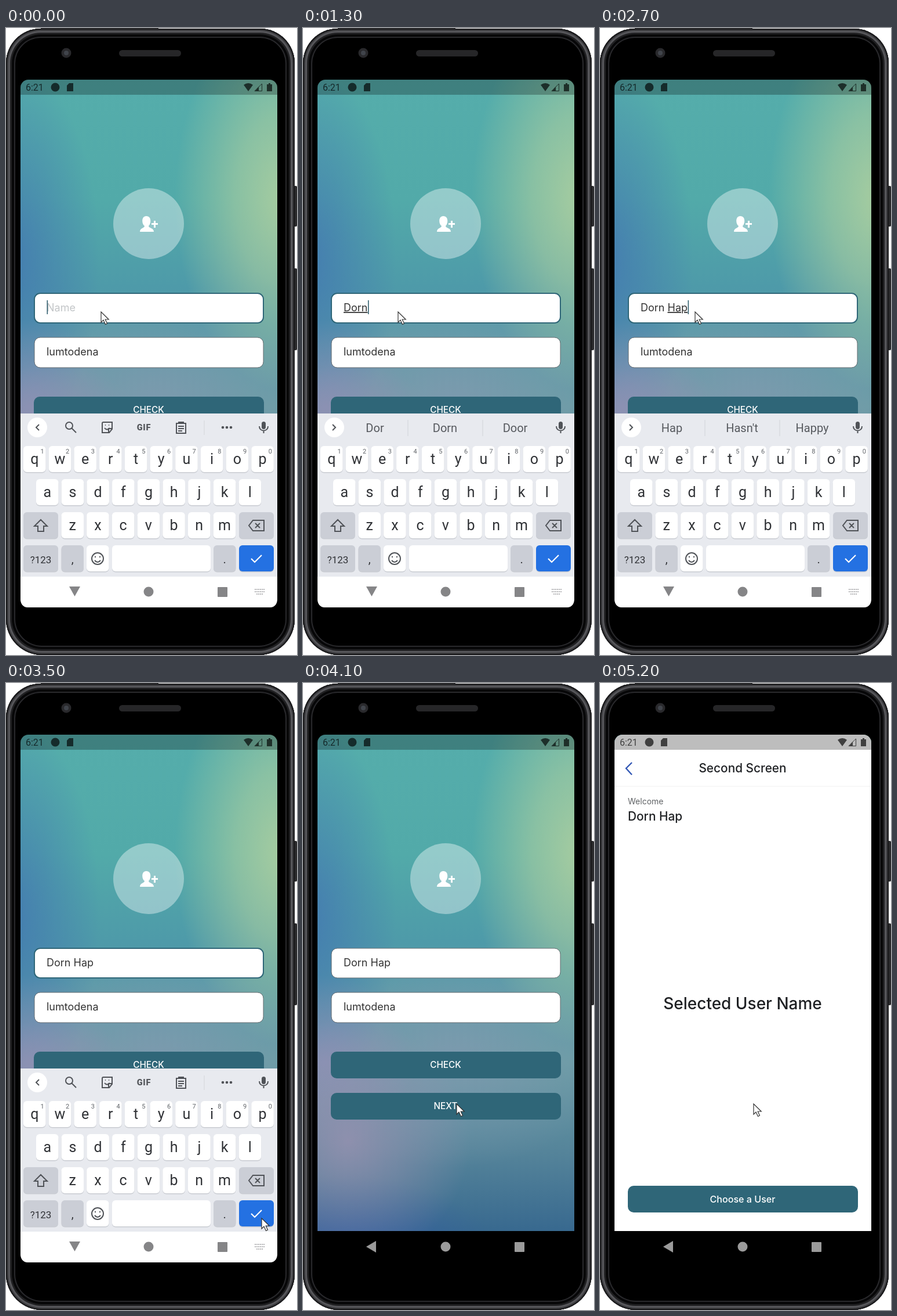
Recreate the animation shown at these times as an HTML page. Size 502x1080 px, loop 5600 ms.

```html
<!DOCTYPE html>
<html lang="en">
<head>
<meta charset="utf-8">
<title>Sign-in flow</title>
<style>
html, body { margin: 0; width: 100%; height: 100%; overflow: hidden; background: #fff; }
div, svg { position: absolute; left: 0; top: 0; }
.side { left: 494px; width: 8px; background: #29292b; border-radius: 2px; }
#phone {
  top: 1px; width: 498px; height: 1079px; border-radius: 60px 60px 62px 62px; background: #000;
  box-shadow: inset 0 0 0 2px #19191b, inset 0 0 0 4px #3c3c3f, inset 0 0 0 7px #56565a,
    inset 0 0 0 10px #202022, inset 0 0 0 14px #070708, inset 0 0 0 16px #29292c;
}
#wall {
  left: 25px; top: 89px; width: 443px; height: 855px; border-radius: 14px 14px 0 0;
  background:
    radial-gradient(190px 330px at 103% 24%, #adcf9fee, #adcf9f99 45%, #adcf9f00),
    radial-gradient(210px 210px at 12% 82%, #9691b0dd, #9691b000),
    radial-gradient(150px 150px at 3% 66%, #938fb8bb, #938fb800),
    radial-gradient(150px 330px at -3% 36%, #447bb0ee, #447bb000),
    radial-gradient(290px 190px at 52% 65%, #8199b0cc, #8199b000),
    radial-gradient(260px 130px at 10% 104%, #365fa0, #365fa000),
    linear-gradient(#55adab, #52aaa9 24%, #4e9aa9 42%, #6a9da5 66%, #55849a 84%, #38698f);
}
text { font-family: Inter, sans-serif; white-space: pre; }
.r text, text.r { font-family: Roboto, sans-serif; }
.line { fill: none; stroke: #505358; stroke-width: 2; }
.white { fill: #fff; }
</style>
</head>
<body>
<div class="side" style="top:272px;height:70px"></div>
<div class="side" style="top:414px;height:141px"></div>
<div id="phone"></div>
<div id="wall"></div>
<svg width="502" height="1080" viewBox="0 0 502 1080">
  <clipPath id="glass"><rect x="25" y="89" width="443" height="910" rx="14"/></clipPath>
  <rect x="60" width="203" height="2" fill="#29292b"/>
  <circle cx="104" cy="43" r="8.5" fill="#29292c"/>
  <circle cx="104" cy="43" r="4" fill="#40444b"/>
  <rect x="195" y="38" width="107" height="11" rx="5.5" fill="#262628"/>

  <g fill="#9b9b9b">
    <path d="M109 971l17-10v20z"/><circle cx="246" cy="971" r="8.5"/>
    <rect x="365" y="963" width="17" height="17" rx="1"/>
  </g>

  <g id="form">
    <circle cx="246" cy="337" r="61" fill="#fff" opacity=".38"/>
    <path class="white" d="M242 324c10 0 8 14 4 17 0 4 9 3 9 10h-24c0-7 8-6 8-10-5-3-6-17 3-17zM255 332h3v4h4v3h-4v5h-3v-5h-4v-3h4z"/>
    <rect id="field" class="white" x="49" y="457" width="395" height="51" rx="10"/>
    <rect class="white" x="49" y="533" width="395" height="52" rx="10" stroke="#666c70"/>
    <text x="70" y="488" font-size="18" fill="#333"><tspan id="done"></tspan><tspan id="word" text-decoration="underline"></tspan></text>
    <text id="hint" x="70" y="488" font-size="18" fill="#c3c6c8">Name</text>
    <rect id="caret" y="469" width="1.6" height="24" fill="#315f6f"/>
    <text x="70" y="564" font-size="18" fill="#333">lumtodena</text>
    <g fill="#2f6678">
      <rect x="48" y="635" width="397" height="46" rx="10"/>
      <rect x="48" y="706" width="397" height="46" rx="10"/>
    </g>
    <g class="white" font-size="15.3" font-weight="500" text-anchor="middle">
      <text x="246" y="663">CHECK</text><text x="246" y="734">NEXT</text>
    </g>
  </g>

  <g clip-path="url(#glass)"><g id="keyboard" class="r">
    <rect x="25" y="664" width="443" height="282" fill="#e8eaef"/>
    <path class="white" d="M25 945h443v41a12 12 0 0 1-12 12H37a12 12 0 0 1-12-12z"/>
    <g fill="#858587">
      <path d="M109 962h19l-9.500 17z"/><circle cx="246" cy="971" r="8.500"/>
      <rect x="365" y="963" width="17" height="17" rx="1"/>
    </g>
    <path d="M429 967h17m-17 4h17m-14 4h11" fill="none" stroke="#b4b4b6" stroke-width="2" stroke-dasharray="2 1"/>
    <circle class="white" cx="54" cy="688" r="17"/>
    <path id="chevron" class="line"/>
    <g id="tools">
      <g class="line">
        <circle cx="109" cy="685" r="6"/><path d="M113 689l8 8"/>
        <path d="M168 679h15v12l-5 6h-12v-16q0-2 2-2zm2 10q4 5 9 0M171 684h1m5 0h1M183 690h-6v6"/>
        <path d="M294 681h16v17h-16zm4 0v-2h8v2M297 686h10m-10 4h10m-10 4h7"/>
      </g>
      <path d="M342 676v25" stroke="#d4d6da"/>
      <text x="238" y="693" font-size="14.500" font-weight="800" text-anchor="middle" letter-spacing=".8" fill="#55585c">GIF</text>
      <g fill="#505358"><circle cx="374" cy="688" r="2.300"/><circle cx="381" cy="688" r="2.300"/><circle cx="388" cy="688" r="2.300"/></g>
    </g>
    <g id="words" font-size="20" text-anchor="middle" fill="#56595e">
      <path d="M181 675v28M310 675v28" stroke="#d0d3d8"/>
      <text x="124" y="696"></text><text x="245" y="696"></text><text x="366" y="696"></text>
    </g>
    <rect x="441" y="678" width="7" height="13" rx="3.500" fill="#505358"/>
    <path class="line" d="M437 686c0 10 15 10 15 0M444.500 693v5"/>
    <g id="keys" text-anchor="middle"></g>
    <path class="line" d="M60 847l11 11h-6v9H55v-9h-6zM426 848h19v18h-19l-7-9zM430 853l8 8m0-8l-8 8"/>
    <g class="line"><circle cx="158" cy="914" r="10"/><path d="M153 917q5 6 10 0M154 910v2m8-2v2"/></g>
    <path d="M423 914l6 6 12-12" fill="none" stroke="#fff" stroke-width="2.200"/>
  </g></g>

  <g id="second">
    <path class="white" d="M25 944V103a14 14 0 0 1 14-14h415a14 14 0 0 1 14 14v841z"/>
    <path d="M25 178h443" stroke="#f1f1f1"/>
    <g id="content">
      <path d="M55 137L45 147l10 11" fill="none" stroke="#3358b5" stroke-width="2.400"/>
      <g font-weight="500" fill="#1f2124">
        <text x="246" y="154" font-size="20.800" text-anchor="middle">Second Screen</text>
        <text x="48" y="237" font-size="20.800">Dorn Hap</text>
        <text x="246" y="562" font-size="28" text-anchor="middle">Selected User Name</text>
      </g>
      <text x="48" y="209" font-size="14" fill="#606366">Welcome</text>
      <rect x="48" y="866" width="397" height="46" rx="10" fill="#2f6678"/>
      <text class="white" x="246" y="894.500" font-size="16.100" font-weight="500" text-anchor="middle">Choose a User</text>
    </g>
  </g>

  <path d="M25 115v-12a14 14 0 0 1 14-14h415a14 14 0 0 1 14 14v12z" opacity=".26"/>
  <g opacity=".66">
    <text class="r" x="34" y="108" font-size="16">6:21</text>
    <circle cx="85" cy="102" r="7.500"/>
    <path d="M109 95h7v14h-11v-10zM410 98q8-6 16 0l-8 11zM450 97h3v-2h3v2h3v12h-9zM436 101v8h-7z"/>
    <path d="M441.500 96v12.500H429z" fill="none" stroke="#000"/>
  </g>
  <path id="mouse" class="white" stroke="#333" stroke-width="1.200" d="M0 0v18l4-4 3.500 7.500 3-1.500-3.300-7h6z"/>
</svg>
<script>
const $ = id => document.getElementById(id);
const set = (id, attrs) => { for (const k in attrs) $(id).setAttribute(k, attrs[k]); };
const show = (id, on) => { $(id).style.display = on ? '' : 'none'; };

// Keyboard
const PITCH = 43.7;
let markup = '';
function key(x, y, w, label = '', fill = '#fff', size = 25) {
  const box = f => `width="${w}" height="45" rx="6" fill="${f}"/>`;
  markup += `<rect x="${x}" y="${y + 1.5}" ${box('#c9ccd2')}<rect x="${x}" y="${y}" ${box(fill)}` +
    `<text x="${x + w / 2}" y="${y + 31}" font-size="${size}" fill="#303236">${label}</text>`;
}
[['qwertyuiop', 30], ['asdfghjkl', 52], ['zxcvbnm', 95.5]].forEach(([letters, x], row) =>
  [...letters].forEach((c, i) => {
    key(x + i * PITCH, 720 + row * 57, 38.5, c);
    if (!row) markup += `<text x="${x + 32.5 + i * PITCH}" y="733" font-size="11" fill="#606469">${(i + 1) % 10}</text>`;
  }));
const GREY = '#cbced6';
key(30, 834, 60, '', GREY);
key(402, 834, 60, '', GREY);
key(30, 891, 60, '?123', GREY, 17);
key(95.5, 891, 38.5, ',', GREY, 20);
key(139, 891, 38.5);
key(183, 891, 170);
key(358, 891, 38.5, '.', GREY, 20);
key(402, 891, 60, '', '#2471e2');
$('keys').innerHTML = markup;

// Start time, finished words, word being typed
const typing = [
  [0, '', ''], [700, '', 'D'], [900, '', 'Do'], [1100, '', 'Dor'], [1300, '', 'Dorn'],
  [1600, 'Dorn ', ''], [2000, 'Dorn ', 'H'], [2200, 'Dorn ', 'Ha'], [2600, 'Dorn ', 'Hap'],
  [3400, 'Dorn Hap', '']
];
const hints = [
  [800, 'D', 'Do', 'Did'], [1000, 'Do', 'Don\'t', 'Dog'], [1200, 'Dor', 'Dorn', 'Door'],
  [1400, 'Dorn', 'Door', 'Dorm'], [1700, 'and', 'is', 'has'], [2100, 'H', 'He', 'How'],
  [2300, 'Ha', 'Have', 'Has'], [2700, 'Hap', 'Hasn\'t', 'Happy']
];
const at = (list, t) => list.filter(s => s[0] <= t).pop();
const progress = (t, from, to) => Math.min(1, Math.max(0, (t - from) / (to - from)));
const smooth = p => p * p * (3 - 2 * p);

function draw(t) {
  const [, done, word] = at(typing, t);
  $('done').textContent = done;
  $('word').textContent = word;
  show('hint', !done && !word);
  const width = $('done').getComputedTextLength() + $('word').getComputedTextLength();
  set('caret', { x: 70.5 + width });
  show('caret', t < 300 || (t >= 700 && t < 3100));
  const focused = t < 3700;
  set('field', { stroke: focused ? '#2f6678' : '#666c70', 'stroke-width': focused ? 2 : 1 });

  const hint = t < 3400 && at(hints, t);
  show('words', hint);
  show('tools', !hint);
  if (hint) $('words').querySelectorAll('text').forEach((el, i) => { el.textContent = hint[i + 1]; });
  set('chevron', { d: hint ? 'M51 683l5 5-5 5' : 'M57 683l-5 5 5 5' });

  const hide = progress(t, 3600, 3900);
  set('keyboard', { transform: `translate(0 ${340 * hide * hide})`, opacity: 1 - hide });
  show('keyboard', hide < 1);

  const open = progress(t, 4300, 4700);
  set('second', { opacity: Math.min(1, open * 1.5) });
  set('content', { transform: `translate(0 ${64 * (1 - open) ** 4})` });

  const a = smooth(progress(t, 2900, 3300)), b = smooth(progress(t, 3600, 4000));
  set('mouse', { transform: `translate(${164 + 277 * a - 176 * b} ${489 + 433 * a - 197 * b})` });
}

function tick() {
  draw(Math.min(5200, Math.floor(performance.now() % 5600 / 100) * 100));
  requestAnimationFrame(tick);
}
tick();
</script>
</body>
</html>
```
